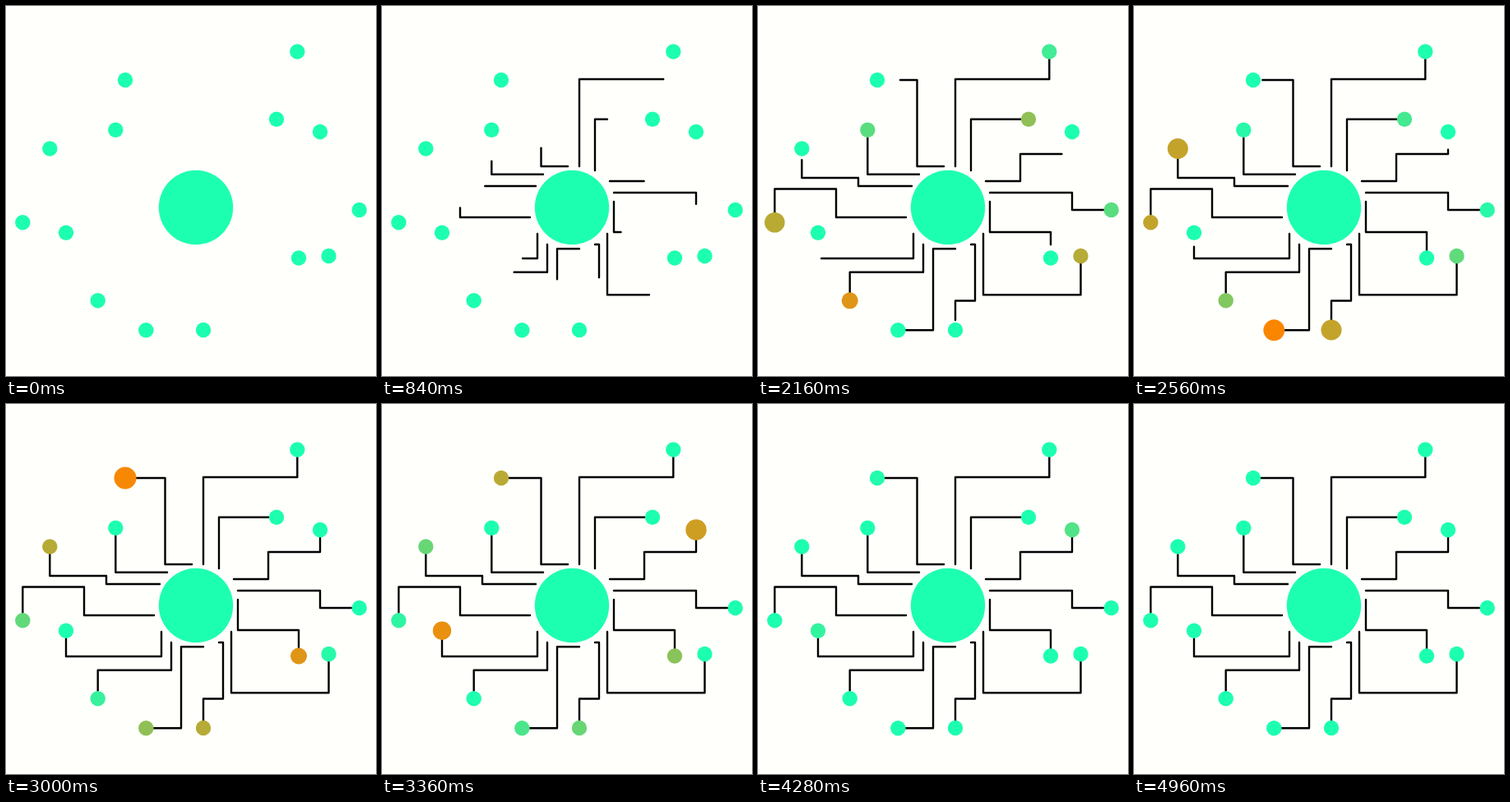
Animation of 450 by 450 pixels, one loop 5 s. Source, as an HTML page:

```html
<!DOCTYPE html>
<html lang="en">
<head>
<meta charset="utf-8">
<title>Circuit nodes</title>
<style>
  html, body { margin: 0; width: 100%; height: 100%; overflow: hidden; background: #fffffc; }
  svg { display: block; width: 100vw; height: 100vh; }
  path { fill: none; stroke: #000; stroke-width: 2.4; stroke-linecap: round; stroke-linejoin: round; }
  circle { fill: #1dffb0; }
</style>
</head>
<body>
<svg viewBox="0 0 450 450">
  <g id="wires"></g>
  <g id="dots"></g>
  <circle cx="231" cy="245" r="45.2"/>
</svg>
<script>
const LOOP = 5000, START = 220;
const RADIUS = 9.2, SWELL = 4.4, PULSE = 205, FADE_DELAY = 75, FADE = 1370;
const GREEN = [29, 255, 176], ORANGE = [250, 134, 0];

// wire path, time the wire is complete, time its dot is largest
const table = [
  ["M240 195V89H354.3V55.5", 1103, 1214],
  ["M259 200V137.7H329", 1496, 1648],
  ["M277 213H319V180H382V153", 3200, 3445],
  ["M282 227H382V248H429.7", 1323, 1381],
  ["M282 238V275H356V306.5", 2580, 2821],
  ["M274 277V351.3H392.5V304", 1703, 1814],
  ["M259 290H264V358.5H240V394", 2437, 2654],
  ["M240 295.3H213V394.3H170.3", 2237, 2488],
  ["M201 290V323.7H111.7V358.3", 1840, 1981],
  ["M189 277V307H73V275.7", 3020, 3217],
  ["M180 257H95V222.5H20.3V263.3", 2105, 2264],
  ["M187 219H122V209H53.3V173.5", 2440, 2654],
  ["M196 204.7H133.3V150.7", 1295, 1381],
  ["M226 195H193.5V90H145", 2800, 3024]
];

const clamp = x => Math.min(1, Math.max(0, x));
const sineOut = x => Math.sin(clamp(x) * Math.PI / 2);
const bezier = (a, b, s) => 3 * (1 - s) * (1 - s) * s * a + 3 * (1 - s) * s * s * b + s * s * s;

// cubic-bezier(1/6, 1/6, 2/3, 1), solved by bisection
function settle(x) {
  x = clamp(x);
  let low = 0, high = 1;
  for (let i = 0; i < 20; i++) {
    const mid = (low + high) / 2;
    if (bezier(1 / 6, 2 / 3, mid) < x) low = mid; else high = mid;
  }
  return bezier(1 / 6, 1, high);
}

function add(name, parent, attrs) {
  const el = document.createElementNS("http://www.w3.org/2000/svg", name);
  for (const key in attrs) el.setAttribute(key, attrs[key]);
  return document.getElementById(parent).appendChild(el);
}

const nodes = table.map(([d, end, peak]) => {
  const wire = add("path", "wires", { d });
  const total = wire.getTotalLength();
  const tip = wire.getPointAtLength(total);
  const dot = add("circle", "dots", { cx: tip.x, cy: tip.y, r: RADIUS });
  return { wire, dot, end, peak, length: total - 8 };
});

function mix(k) {
  return `rgb(${GREEN.map((g, i) => Math.round(g + (ORANGE[i] - g) * k))})`;
}

function draw(t) {
  for (const { wire, dot, end, peak, length } of nodes) {
    const drawn = length * settle((t - START) / (end - START));
    wire.style.visibility = t < START ? "hidden" : "visible";
    wire.style.strokeDasharray = `${Math.max(0.01, drawn)} 1000`;

    const since = t - peak;
    const bump = sineOut(1 - Math.abs(since) / PULSE);
    const heat = since < 0 ? bump : 1 - sineOut((since - FADE_DELAY) / FADE);
    dot.setAttribute("r", RADIUS + SWELL * bump);
    dot.style.fill = mix(heat);
  }
}

const begin = performance.now();
function tick() {
  draw((performance.now() - begin) % LOOP);
  requestAnimationFrame(tick);
}
tick();
</script>
</body>
</html>
```
